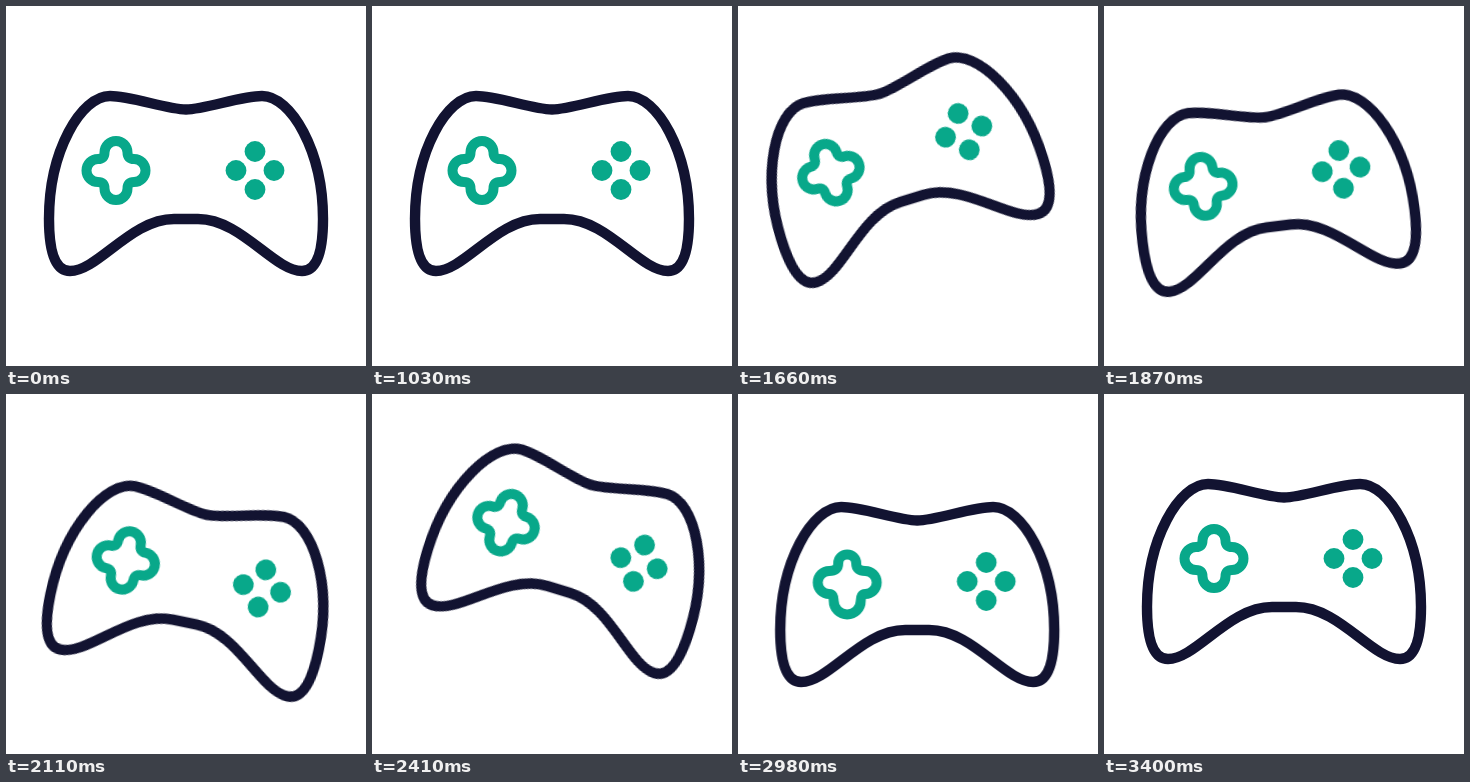
Write an HTML page that moves like this. It is 360 px wide and 360 px high and loops after 3.43 s.

```html
<!DOCTYPE html>
<html lang="en">
<head>
<meta charset="utf-8">
<title>Game controller</title>
<style>
  html, body { margin: 0; width: 100%; height: 100%; overflow: hidden; background: #fff; }
  svg { display: block; width: 100vw; height: 100vh; }
  #tilt { transform-origin: 180px 180px; }
  #body, #pad { fill: none; stroke-linejoin: round; }
  #body { stroke: #121331; stroke-width: 10.4; }
  #pad { stroke: #08a88a; stroke-width: 10; }
  circle { fill: #08a88a; transform-box: fill-box; transform-origin: center; }
</style>
</head>
<body>
<svg viewBox="0 0 360 360">
  <g id="slide"><g id="bounce"><g id="tilt">
    <path id="body" d="M180 103.5C160 103 125 90 104 90C75 90 43 145 43 213C43 240 47 265 64 265C92 265 125 213 168 213H192C235 213 268 265 296 265C313 265 317 240 317 213C317 145 285 90 256 90C235 90 200 103 180 103.5Z"/>
    <g transform="translate(110 164.5)"><path id="pad"/></g>
    <circle id="top" cx="249" cy="145.5" r="10.4"/>
    <circle cx="230" cy="164.5" r="10.4"/>
    <circle cx="268" cy="164.5" r="10.4"/>
    <circle id="bottom" cx="249" cy="183.5" r="10.4"/>
  </g></g></g>
</svg>
<script>
const LOOP = 3430;
const EASE = 'cubic-bezier(.37, 0, .63, 1)';
const get = id => document.getElementById(id);

// Steps are [time in ms, value]; the ends hold their values.
function play(id, prop, steps, format) {
  const all = [[0, steps[0][1]], ...steps, [LOOP, steps[steps.length - 1][1]]];
  get(id).animate(
    all.map(([time, value]) => ({ offset: time / LOOP, [prop]: format(value), easing: EASE })),
    { duration: LOOP, iterations: Infinity }
  );
}

// Four rounded lobes; lean shrinks the upper one and swells the lower one.
function padPath(lean) {
  const r = 11.5, a = r - 2.5 * lean, b = r + 2 * lean;
  const up = -18, down = 18 + 1.5 * lean, left = -r + lean, right = r + lean;
  return `M${-a} ${up}A${a} ${a} 0 0 1 ${a} ${up}` +
    `Q${a} ${left} 18 ${left}A${r} ${r} 0 0 1 18 ${right}` +
    `Q${b} ${right} ${b} ${down}A${b} ${b} 0 0 1 ${-b} ${down}` +
    `Q${-b} ${right} -18 ${right}A${r} ${r} 0 0 1 -18 ${left}` +
    `Q${-a} ${left} ${-a} ${up}Z`;
}

const moveX = v => `translate(${v}px, 0px)`;
const moveY = v => `translate(0px, ${v}px)`;
const turn = v => `rotate(${v}deg)`;
const scale = v => `scale(${v})`;

get('pad').setAttribute('d', padPath(0));

play('slide', 'transform', [[1250, 0], [1640, -15.7], [2430, 16.5], [2630, 16.5], [2970, -.8], [3400, 0]], moveX);
play('bounce', 'transform', [[1030, 0], [1240, 18], [1510, -27.5], [2040, 17.5], [2590, -26.5], [2975, 23], [3400, 0]], moveY);
play('tilt', 'transform', [[1230, 0], [1630, -17.3], [2280, 17], [2640, 17], [2980, 0]], turn);
play('pad', 'd', [[2780, 0], [2980, 1], [3200, 0]], v => `path("${padPath(v)}")`);
play('top', 'transform', [[2560, 1], [2710, .8], [2860, 1]], scale);
play('bottom', 'transform', [[2600, 1], [2750, .77], [2900, 1]], scale);
</script>
</body>
</html>
```
